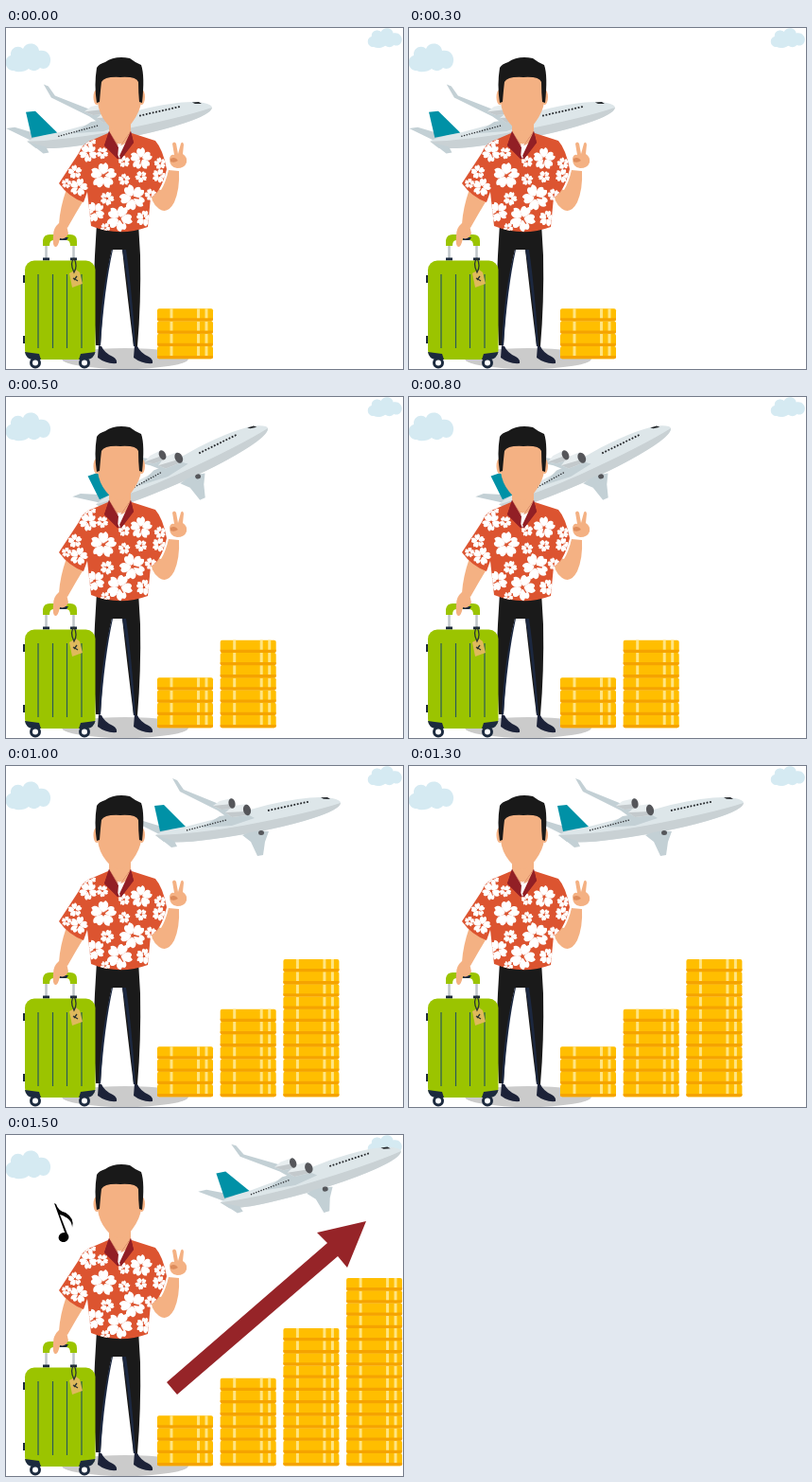
Recreate the animation shown at these times as an HTML page. Size 420 px wide and 360 px high, loop 2 s.

```html
<!DOCTYPE html>
<html lang="en">
<head>
<meta charset="utf-8">
<title>Travel savings</title>
<style>
  html, body { margin: 0; width: 100%; height: 100%; overflow: hidden; background: #fff; }
  svg { display: block; width: 420px; height: 360px; }
</style>
</head>
<body>
<svg viewBox="0 0 420 360">
  <defs>
    <path id="cloud" fill="#d5eaf2" d="M8 28C-2 28-3 14 5 12C4 4 13 0 18 5C21-3 34-2 35 7C43 5 48 12 47 18C46 26 40 27 36 25C32 29 28 29 24 26C19 30 12 30 8 28Z"/>
    <path id="shirt" d="M108 111L87 120Q81 123 77 132L56 164Q66 178 82 184L86 173L90 209Q120 221 150 210L153 179Q164 174 170 149Q166 128 158 119L133 111L121 128Z"/>
    <clipPath id="shirtClip"><use href="#shirt"/></clipPath>
    <g id="flower">
      <g id="petals"></g>
      <path d="M0 0L5-4" stroke="#dc5430" stroke-width="1.2"/>
      <circle r="1.5" fill="#dc5430"/>
    </g>
    <g id="coin">
      <rect width="59" height="13.3" rx="2" fill="#ffbe00"/>
      <path d="M0 10H59V11.3Q59 13.3 57 13.3H2Q0 13.3 0 11.3Z" fill="#f5a300"/>
      <path d="M13.500 0h3v10h-3zM42 0h3v10h-3zM50.500 0h3v10h-3z" fill="#ffe482"/>
    </g>
  </defs>

  <use href="#cloud" x="0" y="17"/>
  <use href="#cloud" transform="translate(383 0.500) scale(.76 .7)"/>

  <g id="plane">
    <path fill="#c3d0d5" d="M176 13L181 15L188 25L230 42L248 52L238 57L224 47L184 27Z"/>
    <path fill="#c3d0d5" d="M136 59L145 58L178 68L176 75L160 71Z"/>
    <path fill="#dde6e9" d="M158 73Q162 69 190 64L233 53L277 41Q325 30 345 34Q354 36 354 39Q353 46 325 55Q285 68 220 77Q185 82 167 80Z"/>
    <path fill="#c9d1d4" d="M158 73Q200 72 250 63Q320 50 354 39Q353 46 325 55Q285 68 220 77Q185 82 167 80Z"/>
    <path fill="#0091a6" d="M157 42L167 41L190 64L163 69Z"/>
    <path fill="#c3d0d5" d="M160 74L178 79L181 85L175 86Z"/>
    <path fill="#c3d0d5" d="M207 65L226 53L252 49L263 55L239 63Z"/>
    <path fill="#c3d0d5" d="M250 73Q263 67 278 69L274 80L272 94L266 95L259 80Z"/>
    <path fill="#e7edef" d="M219 42L226 37L239 34L239 45L228 46ZM232 49L241 42L255 40L255 52L239 54Z"/>
    <path fill="#c3c9cc" d="M219 42L239 40L239 45L228 46ZM232 49L255 48L255 52L239 54Z"/>
    <g fill="#55565a">
      <ellipse cx="239" cy="39.500" rx="3.500" ry="5.300" transform="rotate(-12 239 39.500)"/>
      <ellipse cx="255" cy="46.500" rx="4" ry="5.800" transform="rotate(-12 255 46.500)"/>
      <ellipse cx="270" cy="70.500" rx="3" ry="2.500"/>
    </g>
    <path d="M277 47L321 37.500" stroke="#25282c" stroke-width="1.800" stroke-dasharray="1.800 1.700"/>
    <path d="M191 68L233 57" stroke="#25282c" stroke-width="1.300" stroke-dasharray="1.300 1.500"/>
    <path d="M333 33.300L340 33L343 35L336 34.800Z" fill="#25282c"/>
  </g>

  <ellipse cx="126" cy="349" rx="67" ry="11" fill="#cbcbcb"/>

  <!-- legs and shoes -->
  <path fill="#1c2238" d="M98 335L101 336Q104 343 113 347Q118 350 117 354Q106 355 97 348ZM136 335L139 336Q142 343 151 347Q156 350 155 354Q144 355 135 348Z"/>
  <path fill="#1a1a1a" d="M96 206H140L142 240Q143 290 139 336H135Q128 280 123 234H112Q103 270 100 335H95Q92 280 94 240Z"/>
  <path fill="#1c2840" d="M112 234Q101 275 98 335H100Q104 275 113 234ZM123 234Q131 278 135 336H137Q133 275 127 234Z"/>

  <!-- arms, neck and shirt -->
  <g fill="#f4b183">
    <path d="M64 170Q57 190 56 207L65 211Q74 195 82 182Z"/>
    <path d="M153 168Q152 184 162 191Q171 197 178 184Q184 170 183 151L172 150Q169 163 164 171Z"/>
    <path d="M173 138Q174 133 178 134L176 122Q178 119 180 122L182 133L185 122Q187 119 188 123L187 133Q192 136 191 142Q189 148 181 148Q173 147 173 138Z"/>
    <path d="M109 96V112L120 136L132 112V96Z"/>
  </g>
  <path d="M174 138Q179 135 182 140Q178 143 174 141Z" fill="#dd8c5c"/>
  <use href="#shirt" fill="#dc5430"/>
  <g id="flowers" clip-path="url(#shirtClip)"></g>
  <path d="M112 122L120 138L130 121Z" fill="#fff"/>
  <path d="M109 100V114Q120 131 132 114V100Z" fill="#f4b183"/>
  <path d="M109 109L120 126L132 109L135 121L122 138H118L104 124Z" fill="#921f25"/>
  <path d="M109 109L120 126L132 109L128 123L120 126L113 123Z" fill="#f4b183"/>
  <path d="M112 121Q120 128 128 120L120 138Z" fill="#fff"/>
  <path d="M109 109L119 126L118 138L104 124ZM132 109L120 135L122 138L135 121Z" fill="#921f25"/>

  <!-- head -->
  <g fill="#f4b183">
    <ellipse cx="96" cy="73" rx="3.500" ry="8"/>
    <ellipse cx="143.500" cy="73" rx="3.500" ry="8"/>
    <path d="M97 50H143V78Q142 88 134 99Q121 119 106 100Q98 90 97 78Z"/>
  </g>
  <path fill="#191919" d="M96 79Q93 60 96 42Q98 38 105 36Q115 29 131 32Q136 36 143 39Q147 50 144 79L141 78Q140 68 140 57Q138 51 121 52Q104 51 101 57Q100 65 99 78Z"/>

  <!-- suitcase -->
  <g fill="none" stroke-width="2.500">
    <path d="M42.500 229V245M71.500 229V245" stroke="#bfc5c9"/>
    <path d="M39 244H46M68 244H75" stroke="#1c2a3e" stroke-width="3"/>
  </g>
  <path fill="#9bc400" d="M39 230V224Q40 218 46 218H68Q75 218 75 225V230H68Q68 224 64 224H50Q46 224 46 230Z"/>
  <path d="M57 221H66L64 224H57Z" fill="#1c2a3e"/>
  <path fill="#f4b183" d="M56 206Q50 211 50 219Q49 230 52 231Q55 232 57 222Q63 224 66 217Q65 211 63 206Z"/>
  <path d="M18 261h3v8h-3zM18 325h3v8h-3z" fill="#1c2a3e"/>
  <rect x="20" y="245.500" width="74.500" height="104.500" rx="10" fill="#9bc400"/>
  <path d="M20 342Q27 343 35 344L37 350H28Q21 349 20 342ZM94.500 342Q87 343 79 344L77 350H86Q93 349 94.500 342Z" fill="#1c2a3e"/>
  <path d="M34 260V338M49.500 260V338M64.500 260V338M80 260V338" stroke="#2b5a57" stroke-width="1.200"/>
  <g fill="#fff" stroke="#1c2a3e" stroke-width="3">
    <circle cx="31" cy="353.500" r="4.500"/>
    <circle cx="83" cy="353.500" r="4.500"/>
  </g>
  <path d="M67 259L74 255L78 258L81 270L70 274Z" fill="#dfb95c"/>
  <path d="M72 243Q67 248 72 258Q76 251 72 243M71 264L76 267M72 266L75 262" fill="none" stroke="#2c3430" stroke-width="1.300"/>

  <g id="stacks"></g>

  <g id="finale">
    <path d="M170 261L340 114L329 103L381 91L361 140L351 128L181 274Z" fill="#962428"/>
    <ellipse cx="61" cy="108" rx="5.500" ry="5" transform="rotate(-25 61 108)"/>
    <path d="M51 72L53 73Q55 80 63 82Q73 88 70 98Q70 88 57 84L66 107L64 108Z"/>
  </g>
</svg>
<script>
const $ = id => document.getElementById(id);
const range = n => [...Array(n).keys()];

$('petals').innerHTML = range(5).map(i =>
  `<path transform="rotate(${i * 72})" fill="#fff" d="M-.6-1.500C-7-6-5-12-2-12L0-11L2-13C6-11 6-6 .6-1.500Z"/>`).join('');

// x, y, radius
const flowers = [
  [103, 156, 13], [134, 179, 13], [120, 201, 13], [143, 138, 11], [94, 194, 10],
  [107, 180, 7], [125, 160, 6], [143, 157, 6], [162, 156, 7], [73, 152, 7],
  [87, 132, 9], [77, 168, 9], [125, 141, 6], [102, 132, 6], [146, 201, 8],
  [163, 143, 6], [89, 119, 6], [64, 164, 5], [153, 176, 6], [105, 211, 5]
];
$('flowers').innerHTML = flowers.map(([x, y, r], i) =>
  `<use href="#flower" transform="translate(${x} ${y}) rotate(${i * 47}) scale(${r / 12})"/>`).join('');

const rows = [4, 7, 11, 15];
$('stacks').innerHTML = rows.map((count, s) => '<g>' + range(count).map(i =>
  `<use href="#coin" x="${160 + s * 66.700}" y="${335.900 - i * 13.200}"/>`).join('') + '</g>').join('');
const stacks = [...$('stacks').children];

// nose position and climb angle for each step
const poses = [[218, 84, -0.5], [277, 33, -14], [354, 39, 0], [418, 17, -6]];
const show = (el, on) => el.style.display = on ? '' : 'none';

function draw(now) {
  const step = Math.floor(now % 2000 / 500);
  const [x, y, angle] = poses[step];
  $('plane').setAttribute('transform', `translate(${x} ${y}) rotate(${angle}) translate(-354 -39)`);
  stacks.forEach((stack, i) => show(stack, i <= step));
  show($('finale'), step === 3);
}

const start = performance.now();
function tick() {
  draw(performance.now() - start);
  requestAnimationFrame(tick);
}
tick();
</script>
</body>
</html>
```
